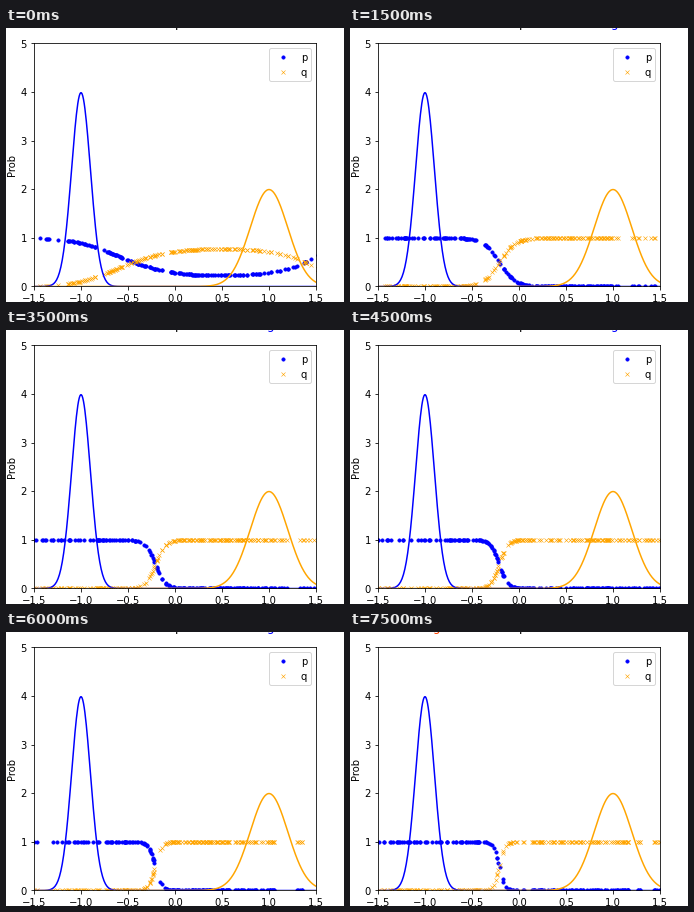
Animation, 338 px wide and 274 px high, one loop 8000 ms. Source, as a matplotlib script:

```python
import numpy as np
import matplotlib.pyplot as plt
from matplotlib.animation import FuncAnimation

W, H, DPI = 338, 274, 72
STEPS, STEP_MS = 16, 500
SAMPLES = 200

plt.rcParams.update({"font.family": "DejaVu Sans", "font.size": 10})
fig = plt.figure(figsize=((W + 1e-6) / DPI, (H + 1e-6) / DPI), dpi=DPI, facecolor="white")
ax = fig.add_axes([28 / W, 15.5 / H, 282 / W, 243 / H])
ax.set(xlim=(-1.5, 1.5), ylim=(0, 5), ylabel="Prob",
       xticks=np.arange(-1.5, 1.6, 0.5), yticks=range(6))


def gaussian(x, mean, sigma):
    return np.exp(-((x - mean) / sigma) ** 2 / 2) / (sigma * np.sqrt(2 * np.pi))


grid = np.linspace(-1.5, 1.5, 400)
ax.plot(grid, gaussian(grid, -1, 0.1), color="blue", lw=1.5)
ax.plot(grid, gaussian(grid, 1, 0.2), color="orange", lw=1.5)

dots_p, = ax.plot([], [], "o", color="blue", ms=3.3, mew=0.7, label="p", zorder=1)
dots_q, = ax.plot([], [], "x", color="orange", ms=3.5, mew=0.6, label="q", zorder=1.1)
ax.legend(loc="upper right")


def heading_letter(x, letter, color):
    """Heading text above the stage: only the descender reaches into view."""
    return fig.text(x / W, (H + 1) / H, letter, color=color, fontsize=12, va="baseline")


heading_letter(169, "p", "black")
blue_tail = heading_letter(260, "g", "blue")
red_tail = heading_letter(82, "g", "orangered")


def classify(x, step):
    """Probability of class p, from a soft first guess to a sharpening edge."""
    if step < 2:
        d = x - 0.4
        logit = np.where(d < 0, 1.7 * d ** 2, 1.27 * np.abs(d) ** 3) - 1.2
    else:
        slope = 8 if step == 2 else 12 + 1.8 * (step - 3)
        logit = -slope * (x + 0.21)
    return 1 / (1 + np.exp(-logit))


def update(step):
    step = 0 if step < 2 else step
    x = np.random.default_rng(40 + step).normal(0, 1, SAMPLES)
    p = classify(x, step)
    dots_p.set_data(x, p)
    dots_q.set_data(x, 1 - p)
    blue_tail.set_visible(step == 3 or 7 <= step <= 13)
    red_tail.set_visible(step >= 14)
    return dots_p, dots_q, blue_tail, red_tail


anim = FuncAnimation(fig, update, frames=STEPS, interval=STEP_MS,
                     repeat=True, repeat_delay=0, blit=False)
plt.show()
```
